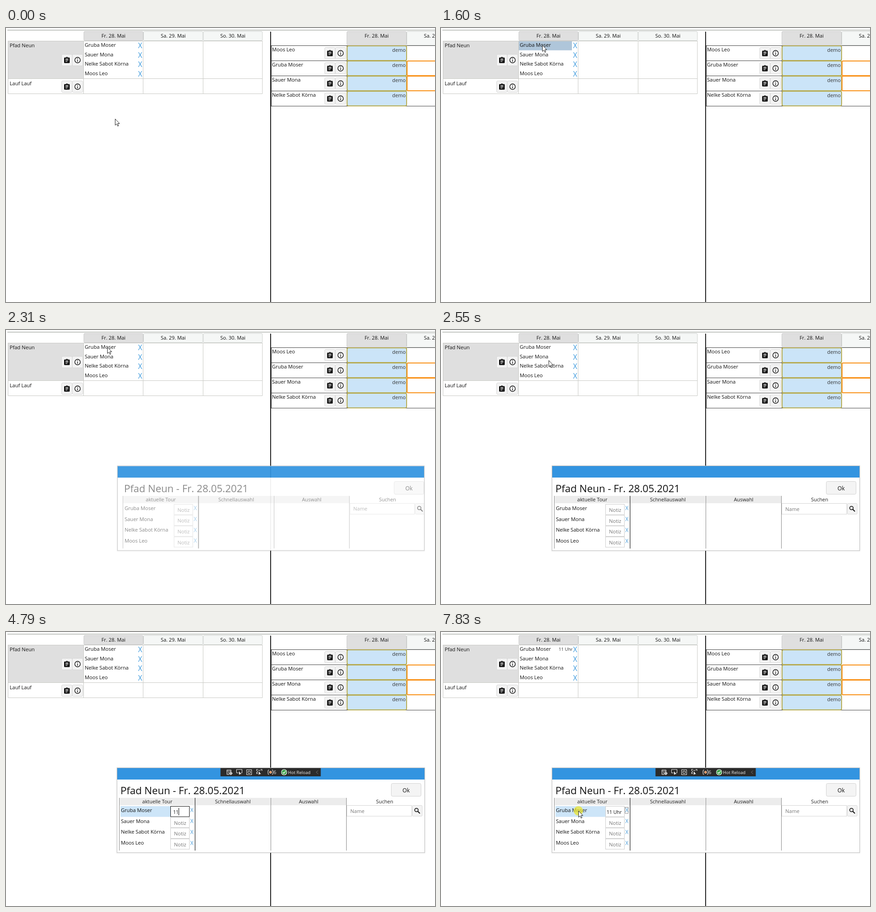
Recreate the animation shown at these times as an HTML page. Size 937 by 598 pixels, loop 8000 ms.

```html
<!DOCTYPE html>
<html lang="de">
<head>
<meta charset="utf-8">
<title>Tourenplan</title>
<style>
html, body { margin: 0; width: 100%; height: 100%; overflow: hidden; background: #fff; }
svg { display: block; width: 100%; height: 100%; }
text { font-family: "Open Sans", "Noto Sans", sans-serif; white-space: pre; }
</style>
</head>
<body>
<svg id="stage" viewBox="0 0 937 598"></svg>
<script>
const LOOP = 8000, STEP = 77.5;
const TOUR = 'Pfad Neun';
const PEOPLE = ['Gruba Moser', 'Sauer Mona', 'Nelke Sabot Körna', 'Moos Leo'];
const byName = [3, 0, 1, 2].map(i => PEOPLE[i]);

// Markup helpers
const rect = (x, y, w, h, fill, extra = '') =>
  `<rect x="${x}" y="${y}" width="${w}" height="${h}" fill="${fill}" ${extra}/>`;
const box = (x, y, w, h, fill, stroke, r = 0, sw = 1, extra = '') =>
  rect(x, y, w, h, fill, `stroke="${stroke}" stroke-width="${sw}" rx="${r}" ${extra}`);
const text = (x, y, s, size = 11.1, fill = '#111', anchor = 'start', extra = '') =>
  `<text x="${x}" y="${y}" font-size="${size}" fill="${fill}" text-anchor="${anchor}" ${extra}>${s}</text>`;
const line = (d, stroke, w = 1, extra = '') =>
  `<path d="${d}" fill="none" stroke="${stroke}" stroke-width="${w}" ${extra}/>`;
const group = (id, body, extra = '') => `<g id="${id}" ${extra}>${body}</g>`;

const clipboard = 'M19 3h-4.2a3 3 0 0 0-5.6 0H5a2 2 0 0 0-2 2v14a2 2 0 0 0 2 2h14a2 2 0 0 0 2-2V5' +
  'a2 2 0 0 0-2-2zM12 3a1 1 0 0 1 0 2 1 1 0 0 1 0-2zM14 17H7v-2h7zM17 13H7v-2h10zM17 9H7V7h10z';

function tools(x, y) {
  const frame = cx => box(cx - 11.5, y - 12.5, 23, 25, '#f3f3f3', '#d6d6d6', 2.5);
  return frame(x) + frame(x + 23.3) +
    `<path transform="translate(${x - 8} ${y - 7.6}) scale(.67)" d="${clipboard}" fill="#000" fill-rule="evenodd"/>` +
    `<circle cx="${x + 23.3}" cy="${y}" r="6" fill="none" stroke="#111" stroke-width="1.4"/>` +
    line(`M${x + 23.3} ${y - 3.4}v1.5m0 1.3v4`, '#111', 1.4);
}

const head = (x, y, w, h, s, active) =>
  box(x + .5, y + .5, w - 1, h - 1, active ? '#dfdfdf' : '#f5f7f6', active ? '#cacaca' : '#ced2cf', 2) +
  text(x + w / 2, 21, s, 10.9, '#111', 'middle');

function tourTable() {
  let s = head(169.5, 7, 130.5, 21, 'Fr. 28. Mai', true) + head(300, 7, 130.5, 21, 'Sa. 29. Mai') +
    head(430.5, 7, 130, 21, 'So. 30. Mai');
  s += rect(4, 28, 165.5, 83, '#dfdfdf') + rect(170, 28, 116, 20.7, '#afc6da', 'id="hover"');
  s += line('M4.5 28V143.5H560V28M4 28.5H560M4 110.5H560M169.5 28V143M299.5 28V143M430.5 28V143', '#c9cac5');
  s += text(8, 42, TOUR) + text(8, 125, 'Lauf Lauf') + tools(133, 70) + tools(133, 128);
  PEOPLE.forEach((p, i) => {
    const y = 41 + i * 20.7;
    s += text(172, y, p) + text(293, y + 2.8, 'X', 15.5, '#3a98dc', 'middle');
  });
  return s + text(257, 41, '11 Uhr', 9.7, '#333', 'start', 'id="note"');
}

function peopleTable() {
  let s = rect(577, 8, 2, 590, '#222');
  s += head(744, 7, 131, 31, 'Fr. 28. Mai', true) + head(875, 7, 130, 31, 'Sa. 29. Mai');
  s += line('M579 38.5H937M579 170.5H937M579.5 38V170M744.5 38V170', '#444');
  byName.forEach((p, i) => {
    const y = 38 + i * 33;
    s += line(`M579 ${y + .5}H744`, '#444');
    s += text(581, y + 13, p) + tools(707.5, y + 17);
    s += box(745, y + 1, 130, 32, '#cbe4f8', '#b7ac53', 3, 2) + text(873, y + 14, 'demo', 10.9, '#333', 'end');
  });
  return s + [72, 105].map(y => box(876, y, 80, 32, '#fff', '#f98f14', 2, 2)).join('');
}

function toolbar() {
  const w = '#f0f0f0';
  const arrow = (x, y) => `<path d="M${x} ${y}v8l2-2 3 .2z" fill="${w}"/>`;
  return rect(468.5, 297, 219, 18, '#2b2b2b') +
    line('M488 311h-5.5v-10h9v4M482 303.5h10M484.5 306.5h3M484.5 309h2', w) +
    `<circle cx="491" cy="308.5" r="2.3" fill="none" stroke="${w}" stroke-width="1.3"/>` +
    line('M491 304.5v8M487 308.5h8', w, .8) +
    line('M508 307.5h-4.5v-7.5h12v7.5h-2', w) + arrow(509, 304) +
    line('M525.5 300.5h11v11h-11zM528.5 303.5h5v5h-5z', w) +
    line('M547.5 303v-3h3M556 300h3v3M547.5 306v3h3M551 302h5M549 303v4', w, 1.2) + arrow(552, 304) +
    line('M574.5 301q-2.5 0-2 3 0 2-1 2 1 0 1 2-.5 3 2 3M581 301q2.5 0 2 3 0 2 1 2-1 0-1 2 .5 3-2 3', w, 1.1) +
    `<circle cx="577.8" cy="306" r="2.6" fill="#e5894d" stroke="${w}" stroke-width=".7"/>` +
    text(584.5, 310, '6', 10, w) +
    `<circle cx="607.5" cy="306" r="6" fill="#3fa34d" stroke="${w}" stroke-width="1.1"/>` +
    line('M604.5 306l2.3 2.6 4-5', '#fff', 1.5) +
    text(616, 310, 'Hot Reload', 9.5, w) + line('M681.5 302.5l-4 3.5 4 3.5', '#777');
}

function dialogBody() {
  let s = text(250, 353.5, TOUR + ' - Fr. 28.05.2021', 22.1);
  s += box(841.5, 330.5, 65, 28, '#f4f4f4', '#d2d2d2', 3) +
    box(842, 331, 64, 27, 'none', '#111', 3, 2, 'id="okFocus"') + text(874, 349.5, 'Ok', 12.2, '#111', 'middle');
  [['aktuelle Tour', 330.5], ['Schnellauswahl', 495.5], ['Auswahl', 661], ['Suchen', 827]].forEach(([h, x], i) => {
    if (i < 3) s += rect(x - 82, 362, 164, 16, '#ececec');
    s += text(x, 374.3, h, 10.9, '#222', 'middle');
  });
  s += line('M247.5 362V477M578.5 362V477M743.5 362V477', '#888') + line('M413 362V477', '#555', 1.6);
  s += rect(250, 380, 109.5, 23.5, '#cde5f8', 'id="picked"');
  PEOPLE.forEach((p, i) => {
    const y = 380 + i * 23.7;
    s += text(251, y + 13, p) + box(359.5, y + .5, 41, 22.5, '#fff', '#ccc', 0, 1, `id="field${i}"`) +
      text(367, y + 16.8, 'Notiz', 11, '#777', 'start', `id="hint${i}"`) +
      text(406, y + 13.4, 'X', 12, '#4b9edc', 'middle');
  });
  s += `<g clip-path="url(#inner)">${text(365, 396.8, '', 10.5, '#111', 'start', 'id="typed"')}</g>`;
  s += rect(364, 384, 1, 16, '#000', 'id="caret"');
  s += box(402, 382.5, 7, 13.5, 'none', '#222', 0, 1, 'id="focus" stroke-dasharray="1 1"');
  s += box(744.5, 378.5, 141.5, 23.5, '#fff', '#d4d4d4') + text(752, 394.5, 'Name', 11, '#777');
  s += box(887.5, 378.5, 21.5, 23.5, '#f4f4f4', '#d8d8d8', 2);
  return s + '<circle cx="896.5" cy="388.5" r="3.8" fill="none" stroke="#111" stroke-width="1.6"/>' +
    line('M899.3 391.3l4.7 4.7', '#111', 2);
}

const stage = document.getElementById('stage');
stage.innerHTML =
  `<defs><clipPath id="frame"><rect x="243" y="297" width="671" height="184"/></clipPath>
   <clipPath id="inner"><rect x="362" y="381" width="37" height="22"/></clipPath></defs>` +
  rect(0, 0, 937, 598, '#fff') + rect(3, 3.5, 934, 2.4, '#cacdc9') + tourTable() + peopleTable() +
  group('dialog',
    box(241.5, 295.5, 674, 188, 'none', '#000', 2, 2, 'opacity=".04"') +
    box(242.5, 296.5, 672, 185, '#fff', '#bdbdbd') + rect(243, 297, 671, 25, '#3394e0') +
    `<g clip-path="url(#frame)">${group('body', dialogBody())}</g>` + group('bar', toolbar())) +
  '<circle id="click" r="10.2" fill="#e9e432" opacity=".75"/>' +
  group('arrow', '<path d="M.5 .5V14.2L3.7 11.3 5.9 16.2 8 15.3 5.9 10.5H10Z" fill="#fff" stroke="#222"/>') +
  group('beam', line('M-3 -7.5h2.5q.5 0 .5 1v13q0 1-.5 1H-3M3 -7.5H.5q-.5 0-.5 1M3 7.5H.5q-.5 0-.5-1', '#111'));

const el = {};
stage.querySelectorAll('[id]').forEach(n => el[n.id] = n);
const show = (n, on) => n.style.display = on ? '' : 'none';
const put = (n, attrs) => { for (const k in attrs) n.setAttribute(k, attrs[k]); };
const clamp = v => Math.max(0, Math.min(1, v));
const within = (t, a, b) => t >= a && t < b;

// Pointer path: time, x, y
const PATH = [
  [0, 238, 198], [362, 238, 198], [600, 236, 170], [900, 226, 82], [1137, 221, 42], [1215, 221, 37],
  [2460, 221, 37], [2925, 305, 211], [3310, 387.5, 357], [3540, 384, 384], [3697, 380, 391],
  [6732, 380, 391], [7000, 372, 397], [7350, 326, 396], [7585, 300, 390], [LOOP, 300, 390]
];
const MOVES = [440, 2150, 3000, 6810];

function pointer(t) {
  const start = MOVES.filter(m => m <= t).pop() || 0;
  const q = start ? start + Math.floor((t - start) / STEP) * STEP : 0;
  const i = PATH.findIndex(k => k[0] > q), [t0, x0, y0] = PATH[i - 1], [t1, x1, y1] = PATH[i];
  const p = (q - t0) / (t1 - t0);
  return [x0 + (x1 - x0) * p, y0 + (y1 - y0) * p];
}

// Note typing: time, text, text x, caret x (0 = blinked off)
const TYPING = [
  [0, '', 365, 0], [3930, '', 365, 364], [4400, '', 365, 0], [4630, '1', 365, 371], [4710, '11', 365, 377],
  [5020, '11 ', 365, 380], [5250, '11 U', 365, 388], [5480, '11 Uh', 364.5, 394], [6030, '11 Uh', 364.5, 0],
  [6490, '11 Uhr', 361, 395], [6810, '11 Uhr', 361.7, 0]
];

function draw(t) {
  const [x, y] = pointer(t);
  const hidden = within(t, 4630, 6810);
  const inField = t > 3000 && within(x, 360, 401) && within(y, 380, 404);
  show(el.arrow, !hidden && !inField);
  show(el.beam, !hidden && inField);
  put(el.arrow, { transform: `translate(${x} ${y})` });
  put(el.beam, { transform: `translate(${x} ${y})` });
  show(el.click, within(t, 1520, 1600) || within(t, 3850, 3930) || t >= 7830);
  put(el.click, { cx: x, cy: y + .3 });

  const row = Math.floor((y - 28) / 20.7);
  show(el.hover, t < 2150 && row >= 0 && row < 4);
  put(el.hover, { y: 28 + row * 20.7 });

  // Window pops open while its content slides in
  const open = clamp((t - 2150) / 230), slide = clamp((t - 2150) / 420);
  const scale = 1 - .1 * (1 - open) ** 3;
  show(el.dialog, t >= 2150);
  put(el.dialog, {
    opacity: clamp(.2 + open * 1.05),
    transform: `translate(578 389) scale(${scale}) translate(-578 -389)`
  });
  put(el.body, { opacity: clamp(slide * 1.35), transform: `translate(${30 * (1 - slide) ** 3} 0)` });
  show(el.bar, t >= 2700);

  show(el.okFocus, within(t, 2600, 3930));
  put(el.field0, { stroke: within(t, 3930, 6810) ? '#111' : inField ? '#999' : '#ccc' });
  show(el.picked, t >= 3850 || (t > 3000 && y >= 380));

  const [, note, noteX, caretX] = TYPING.filter(k => k[0] <= t).pop();
  el.typed.textContent = note;
  put(el.typed, { x: noteX });
  show(el.hint0, !note);
  show(el.caret, caretX > 0);
  put(el.caret, { x: caretX });
  show(el.note, t >= 6810);
  show(el.focus, t >= 6810);
}

const begin = performance.now();
function tick() {
  draw((performance.now() - begin) % LOOP);
  requestAnimationFrame(tick);
}
tick();
</script>
</body>
</html>
```
